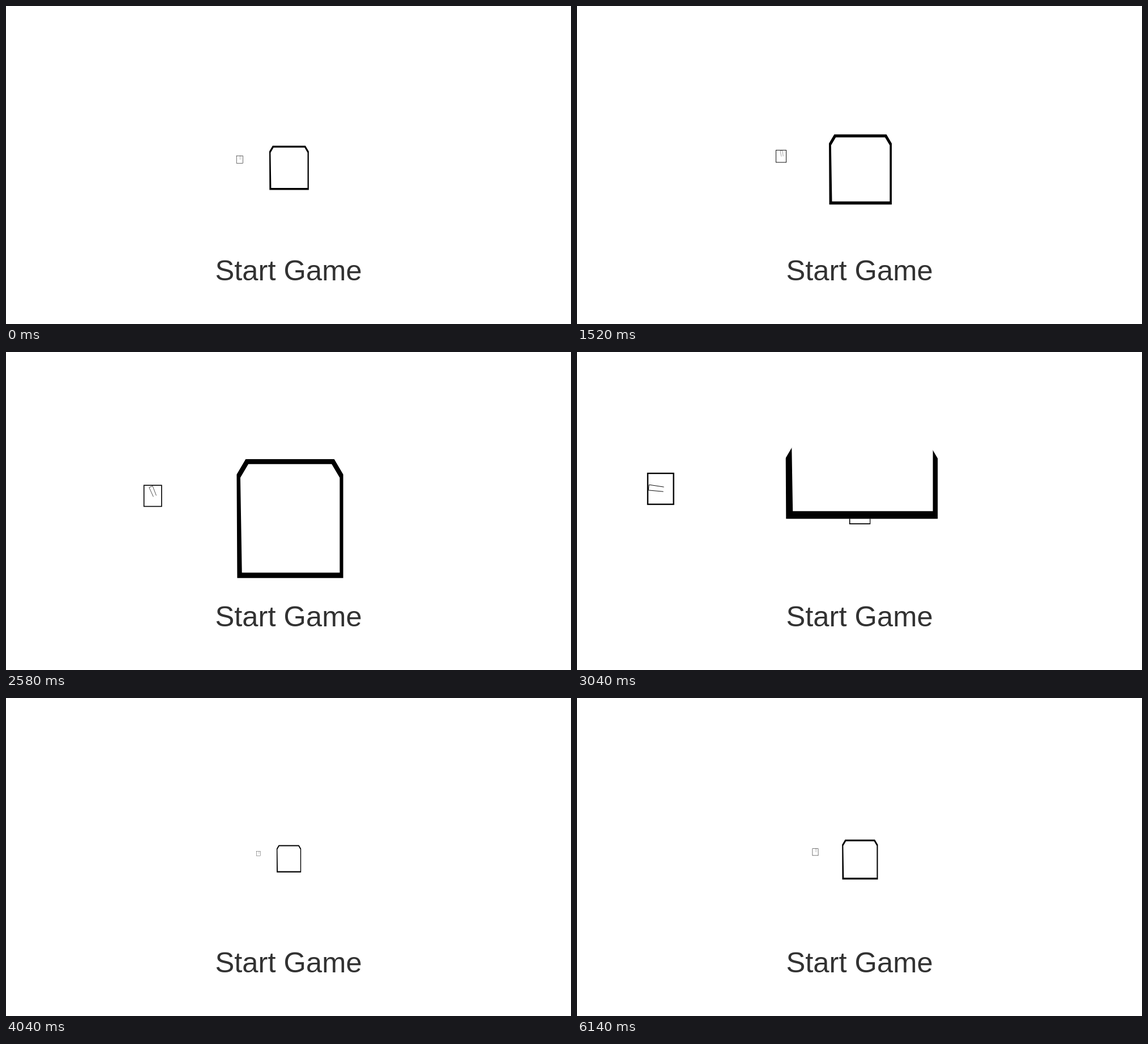
Recreate the animation shown at these times as an HTML page with a canvas. Size 998 px wide and 561 px high, loop 6.18 s.

```html
<!DOCTYPE html>
<html lang="en">
<head>
<meta charset="utf-8">
<title>Start Game</title>
<style>
html, body { margin: 0; width: 100%; height: 100%; overflow: hidden; background: #fff; }
canvas { display: block; }
</style>
</head>
<body>
<canvas id="stage" width="998" height="561"></canvas>
<script>
const ctx = document.getElementById('stage').getContext('2d');
const LOOP = 6180, CX = 499, CY = 280.5;
const SPEED = 144092;             // door scale = SPEED / time until the camera reaches it
const NEAR = 4105, FAR = 10670;   // arrival times of the two doors
const GONE = 3625, OPEN = 2835, OPEN_TIME = 385, LIFT = 2.079;

function smooth(x) {
  x = Math.min(1, Math.max(0, x));
  return x * x * (3 - 2 * x);
}

// Run draw() in units of the given scale around the vanishing point
function inDepth(scale, draw) {
  ctx.save();
  ctx.translate(CX, CY);
  ctx.scale(scale, scale);
  draw();
  ctx.restore();
}

// Rectangle with cut upper corners and a slightly leaning left side
function panel(left, top, right, bottom, cut, lean) {
  const drop = 1.7 * cut;
  ctx.moveTo(left, top + drop);
  ctx.lineTo(left + cut, top);
  ctx.lineTo(right - cut, top);
  ctx.lineTo(right, top + drop);
  ctx.lineTo(right, bottom);
  ctx.lineTo(left + lean, bottom);
  ctx.closePath();
}

function outline() {
  ctx.beginPath();
  panel(-.968, -.967, 1.022, 1.25, .168, .01);
}

function drawDoor(scale, lift) {
  inDepth(scale, () => {
    ctx.translate(0, -lift);
    outline();
    ctx.fillStyle = '#fff';
    ctx.fill();
    panel(-.9, -.876, .957, 1.15, .15, .03);
    ctx.fillStyle = '#000';
    ctx.fill('evenodd');
  });
}

// Wall switch: a box with a U-shaped lever that turns about its open end
function drawSwitch(remaining, turn) {
  inDepth(4030 / (remaining - 75), () => {
    ctx.strokeStyle = '#000';
    ctx.lineWidth = .58;
    ctx.strokeRect(-91.8, -16.3, 11.2, 13.4);

    ctx.translate(-84.9, -9.4);
    ctx.rotate(turn);
    ctx.lineWidth = .22;
    ctx.beginPath();
    ctx.moveTo(-1, 0);
    ctx.lineTo(-1.2, -6.5);
    ctx.lineTo(1.2, -6.5);
    ctx.lineTo(1, 0);
    ctx.stroke();
  });
}

function drawFar(t) {
  drawDoor(SPEED / (FAR - t), 0);
  drawSwitch(FAR - t, 0);
}

function drawNear(t) {
  const scale = SPEED / (NEAR - t);
  const lift = LIFT * smooth((t - OPEN) / OPEN_TIME);
  ctx.save();
  if (lift > 0) {
    inDepth(scale, outline);
    ctx.clip();
    drawFar(t);
  }
  drawDoor(scale, lift);
  ctx.restore();
  const tilt = .23 * Math.min(1, t / 2000);
  drawSwitch(NEAR - t, -tilt - 1.22 * smooth((t - 2500) / 350));
}

function frame() {
  const t = performance.now() % LOOP;
  ctx.fillStyle = '#fff';
  ctx.fillRect(0, 0, 998, 561);
  if (t < GONE) drawNear(t);
  else drawFar(t);

  ctx.fillStyle = '#323232';
  ctx.font = '50.7px "Liberation Sans", Arial, sans-serif';
  ctx.textAlign = 'center';
  ctx.fillText('Start Game', CX, 483.6);
  requestAnimationFrame(frame);
}
frame();
</script>
</body>
</html>
```
